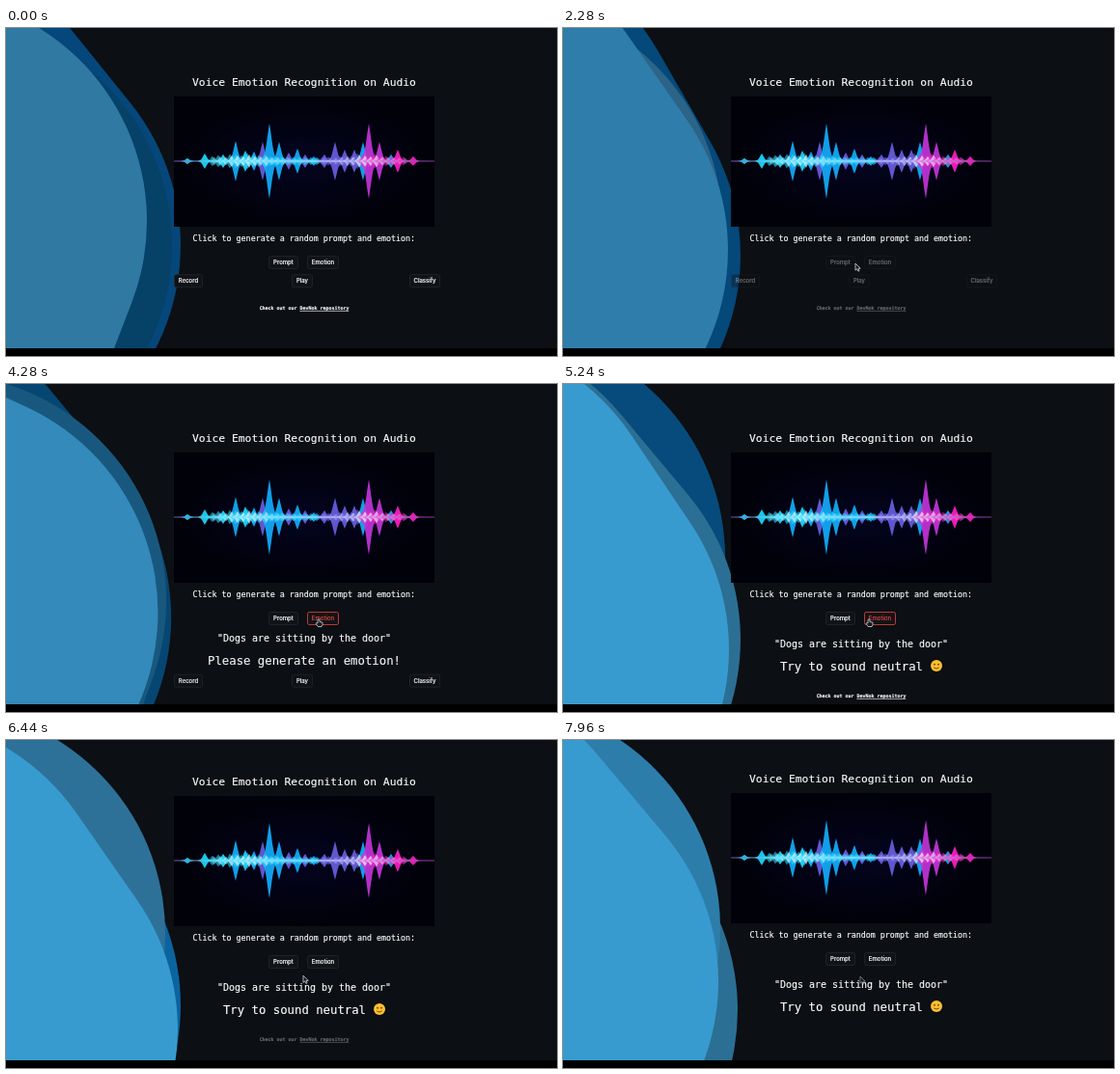
Recreate the animation shown at these times as an HTML page. Size 571x340 px, loop 8 s.

```html
<!DOCTYPE html>
<html lang="en">
<head>
<meta charset="utf-8">
<title>Voice Emotion Recognition</title>
<style>
html, body { margin: 0; width: 100%; height: 100%; overflow: hidden; background: #0c0f13; }
svg { display: block; width: 571px; height: 340px; }
text { fill: #fafafa; stroke: #fafafa; stroke-width: .15; text-anchor: middle; font-family: "DejaVu Sans Mono", monospace; }
.title { font-size: 11.33px; }
.lead { font-size: 8.34px; }
.quote { font-size: 9.97px; }
.big { font-size: 12.3px; }
.foot { font-size: 4.98px; font-weight: bold; }
.foot tspan { text-decoration: underline; }
.button rect { fill: #101318; stroke: #24272d; stroke-width: .8; }
.button text { font: 500 6px Inter, sans-serif; }
.hover rect { stroke: #d9483f; }
.hover text { fill: #e8503f; stroke: none; }
.active rect { stroke: #e04a40; fill: #171218; }
</style>
</head>
<body>
<svg viewBox="0 0 571 340">
  <defs>
    <radialGradient id="night">
      <stop offset="0" stop-color="#040420"/>
      <stop offset="1" stop-color="#010109"/>
    </radialGradient>
    <linearGradient id="beam" x1="174" x2="444" gradientUnits="userSpaceOnUse">
      <stop offset="0" stop-color="#7a4bb0"/>
      <stop offset=".15" stop-color="#5ce6ff"/>
      <stop offset=".6" stop-color="#c6d4ff"/>
      <stop offset="1" stop-color="#8a35a0"/>
    </linearGradient>
  </defs>
  <rect width="571" height="340" fill="#0c0f13"/>
  <g id="blobs"></g>
  <g id="page">
    <text class="title" x="309" y="60">Voice Emotion Recognition on Audio</text>
    <rect x="174" y="71" width="270" height="135" fill="url(#night)"/>
    <g id="wave" transform="translate(0 138)"></g>
    <text class="lead" x="308.8" y="221">Click to generate a random prompt and emotion:</text>
    <g id="choices"></g>
    <g id="answers">
      <text class="quote" x="309" y="272.5">"Dogs are sitting by the door"</text>
      <text class="big" id="ask" x="309" y="296.5">Please generate an emotion!</text>
      <g id="neutral">
        <text class="big" x="299" y="296.5">Try to sound neutral</text>
        <g transform="translate(387 292)">
          <circle r="6" fill="#fbc02f"/>
          <circle cx="-2" cy="-1.3" r=".9" fill="#6b3a10"/>
          <circle cx="2" cy="-1.3" r=".9" fill="#6b3a10"/>
          <path d="M-2.7 2Q0 4 2.7 2" fill="none" stroke="#6b3a10" stroke-width=".9"/>
        </g>
      </g>
    </g>
    <g id="actions"></g>
    <text class="foot" id="foot" x="309" y="292">Check out our <tspan>DevNok repository</tspan></text>
  </g>
  <g id="cursor" stroke="#d5d8dc" stroke-width=".8" stroke-linejoin="round">
    <path id="arrow" fill="#15181c" d="M0 0V7.2L1.7 5.7 2.9 8.2 4.1 7.6 3 5.2H5.2Z"/>
    <path id="hand" fill="#15181c" d="M-1 4V.3Q0-.8 1 .3V2.5L4 3.2V5.5L3 7.5H-.8L-3 4.4-2 3.6Z"/>
  </g>
  <rect y="332" width="571" height="8" fill="#000"/>
</svg>
<script>
const LOOP = 8000;
const HALF = 290, RADIUS = 235;
const CORNER = (HALF - RADIUS) * Math.SQRT2;
const TIMES = [0, 960, 2280, 3280, 5240, 6440, 7960];
const $ = id => document.getElementById(id);

function add(parent, tag, attrs, content = '') {
  const node = document.createElementNS('http://www.w3.org/2000/svg', tag);
  for (const key in attrs) node.setAttribute(key, attrs[key]);
  node.textContent = content;
  return parent.appendChild(node);
}

// Each pose: rightmost x, its y, and the direction of a rounded corner in degrees.
const layers = [
  {
    poses: [[181, 225, 6], [153, 185, 65], [184, 235, 105], [155, 300, 123],
            [168, 180, 245], [181, 275, 285], [181, 280, 370]],
    colors: ['#05477a', '#05477a', '#05487a', '#064168', '#064b7c', '#0b64a0', '#2b6f94']
  },
  {
    poses: [[172, 225, -5], [145, 250, 45], [165, 205, 70], [150, 300, 123],
            [184, 265, 185], [165, 200, 250], [163, 195, 330]],
    colors: ['#064168', '#064168', '#2b6487', '#064168', '#2b6f94', '#2d7199', '#2d7dab']
  },
  {
    poses: [[146, 200, -24], [143, 285, 26], [171, 230, 100], [135, 315, 127],
            [172, 275, 191], [178, 300, 280], [161, 250, 365]],
    colors: ['#2f79a3', '#2f79a3', '#2f7daa', '#2f79a3', '#389bd0', '#389bd0', '#389bd0']
  }
];

for (const layer of layers) {
  layer.node = add($('blobs'), 'rect', {
    x: -HALF, y: -HALF, width: 2 * HALF, height: 2 * HALF, rx: RADIUS
  });
  layer.keys = layer.poses.map(([x, y, turn]) => {
    // Quarter turns look alike, so the corner nearest the right side sets the centre.
    const facing = (turn - 90 * Math.round(turn / 90)) * Math.PI / 180;
    return [x - RADIUS - CORNER * Math.cos(facing), y - CORNER * Math.sin(facing), turn];
  });
  layer.rgb = layer.colors.map(c => [1, 3, 5].map(i => parseInt(c.slice(i, i + 2), 16)));
}

function tween(times, values, t) {
  let i = 0;
  while (i < times.length - 2 && t >= times[i + 1]) i++;
  const p = Math.min(1, Math.max(0, (t - times[i]) / (times[i + 1] - times[i])));
  return values[i].map((v, k) => v + (values[i + 1][k] - v) * p);
}

function spindle(x, h, w, fill, opacity) {
  const half = s => `M${x - w} 0C${x - w * .4} ${-s * h * .1} ${x - w * .35} ${-s * h * .5} ${x} ${-s * h}`
    + `C${x + w * .35} ${-s * h * .5} ${x + w * .4} ${-s * h * .1} ${x + w} 0`;
  add($('wave'), 'path', { d: half(1) + half(-1), fill, opacity });
}

const hues = { c: '#1fdcff', b: '#14b0ff', p: '#6a5fe2', m: '#c636dc', k: '#ff1fc8' };
const peaks = `188 3 c,206 8 c,225 7 c,266 20 p,238 21 b,248 11 c,257 10 b,283 20 b,273 39 b,
  293 9 p,302 13 b,310 7 p,319 5 b,330 7 p,341 20 p,351 12 p,361 12 p,370 20 b,387 20 m,
  376 39 m,399 7 b,406 12 k,422 5 k`.split(',').map(s => s.trim().split(' '));
for (const [x, h, hue] of peaks) spindle(+x, +h, 7 + h * .06, hues[hue], .9);

// Small overlapping ripples, brightest around the two loud passages.
for (let i = 0; i < 34; i++) {
  const x = 214 + i * 6;
  const swell = Math.exp(-(((x - 246) / 32) ** 2)) + Math.exp(-(((x - 370) / 25) ** 2));
  const height = 4 + 5 * swell * (.7 + .3 * Math.sin(i * 2.3));
  spindle(x, height, 7, x < 325 ? hues.c : x < 370 ? hues.p : hues.k, .6);
  spindle(x + 2, height * .8, 6, '#eaf6ff', .15 + .55 * Math.min(1, swell));
}
add($('wave'), 'rect', { x: 174, y: -.5, width: 270, height: 1, fill: 'url(#beam)' });

function button(group, label, x, y, width) {
  const node = add($(group), 'g', { class: 'button' });
  add(node, 'rect', { x, y, width, height: 13, rx: 1.8 });
  add(node, 'text', { x: x + width / 2, y: y + 8.7 }, label);
  return node;
}
button('choices', 'Prompt', 272.5, 236.5, 30);
const emotion = button('choices', 'Emotion', 312.5, 236.5, 32);
button('actions', 'Record', 174.5, 255.7, 29);
button('actions', 'Play', 296.5, 255.7, 21);
button('actions', 'Classify', 418.5, 255.7, 31);

const cursorTimes = [250, 900, 1100, 1500, 1900, 2280, 2600, 3000, 4300, 5240, 5700, 6000, 7960];
const cursorPath = [[378, 334], [270, 223], [270, 224], [287, 242], [290, 243], [303, 244], [305, 244],
  [325, 244], [324, 244], [317, 244], [316, 244], [308, 244], [308, 245]];

const show = (id, on) => $(id).style.display = on ? '' : 'none';
const fade = (t, start) => 1 - .62 * Math.min(1, Math.max(0, (t - start) / 350));

function draw(t) {
  for (const { node, keys, rgb } of layers) {
    const [x, y, turn] = tween(TIMES, keys, t);
    node.setAttribute('transform', `translate(${x} ${y}) rotate(${turn - 45})`);
    node.setAttribute('fill', `rgb(${tween(TIMES, rgb, t).map(Math.round)})`);
  }

  const prompted = t >= 2600, answered = t >= 4640;
  const waiting = !prompted ? fade(t, 1800) : 1;
  const lift = t < 6120 ? 0 : t < 7000 ? -13 : -16;
  $('page').setAttribute('transform', `translate(0 ${lift})`);

  show('answers', prompted);
  show('ask', !answered);
  show('neutral', answered);
  show('actions', !answered);
  show('foot', t < 7000);
  $('answers').setAttribute('transform', `translate(0 ${answered ? 0 : -6})`);
  $('actions').setAttribute('transform', `translate(0 ${prompted ? 45.5 : 0})`);
  $('foot').setAttribute('y', answered ? 325 : prompted ? 338 : 292);

  $('choices').style.opacity = waiting;
  $('actions').style.opacity = prompted ? fade(t, 4260) : waiting;
  $('ask').style.opacity = fade(t, 4260);
  $('foot').style.opacity = answered ? fade(t, 6050) : waiting;

  const hovering = t >= 2880 && t < 5800;
  emotion.setAttribute('class', 'button' + (hovering ? ' hover' : '') + (hovering && t >= 4000 ? ' active' : ''));
  const [x, y] = tween(cursorTimes, cursorPath, t);
  show('cursor', t >= 250);
  show('hand', hovering);
  show('arrow', !hovering);
  $('cursor').setAttribute('transform', `translate(${x} ${y})`);
  $('cursor').style.opacity = t > 7200 ? .6 : 1;
}

const start = performance.now();
function frame(now) {
  draw(Math.max(0, now - start) % LOOP);
  requestAnimationFrame(frame);
}
draw(0);
requestAnimationFrame(frame);
</script>
</body>
</html>
```
